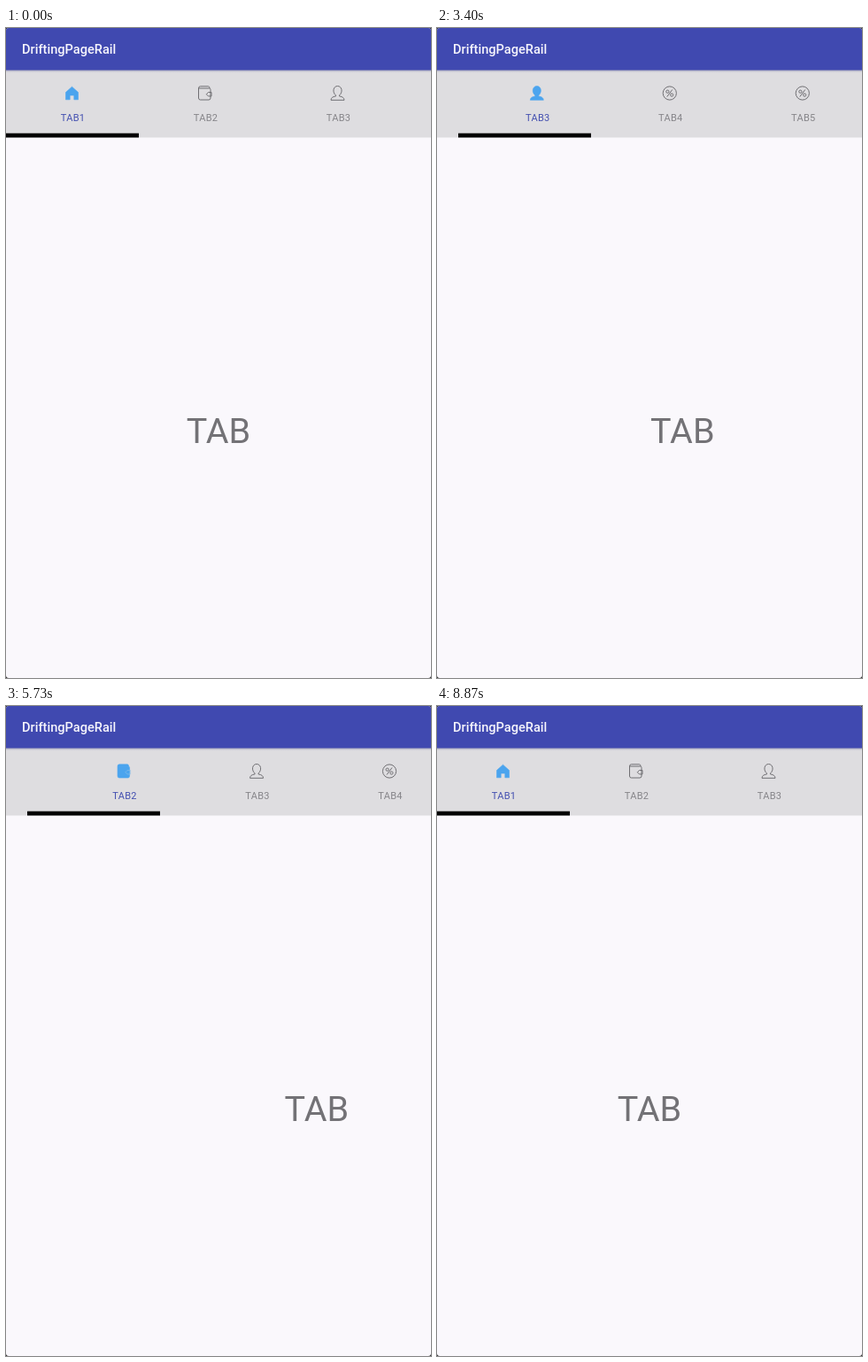
Recreate the animation shown at these times as an HTML page. Size 480 px wide and 733 px high, loop 8990 ms.

```html
<!DOCTYPE html>
<html lang="en">
<head>
<meta charset="utf-8">
<title>Sliding tabs</title>
<style>
  html, body { margin: 0; width: 100%; height: 100%; overflow: hidden; background: #222; }
  svg { display: block; font-family: Roboto, sans-serif; }
  .title { font-size: 14.6px; font-weight: 500; fill: #f6f5fc; }
  .page { font-size: 39.5px; fill: #737276; text-anchor: middle; }
  .tab text { font-size: 11px; letter-spacing: .3px; fill: #858488; text-anchor: middle; }
  .tab path { fill: none; stroke: #6f6e72; stroke-linejoin: round; }
  .tab.on text { fill: #434fb0; }
  .tab.on path { fill: #4ba4ee; stroke: #4ba4ee; stroke-width: .6; }
  .tab.on .clasp { fill: none; stroke: #8fbfe6; }
</style>
</head>
<body>
<svg width="480" height="733" viewBox="0 0 480 733">
  <defs>
    <clipPath id="screen"><rect width="480" height="733" rx="3"/></clipPath>
    <linearGradient id="shade" x2="0" y2="1">
      <stop stop-color="#9d9eba"/><stop offset="1" stop-color="#dedde0"/>
    </linearGradient>
  </defs>
  <g clip-path="url(#screen)">
    <rect width="480" height="733" fill="#faf8fc"/>
    <g id="pages"></g>
    <rect y="47" width="480" height="76.5" fill="#dedde0"/>
    <g id="strip"><rect id="bar" y="118.7" width="150" height="4.8"/></g>
    <rect y="47" width="480" height="3" fill="url(#shade)"/>
    <rect width="480" height="47.5" fill="#4049b0"/>
    <text class="title" x="18" y="28.5">DriftingPageRail</text>
  </g>
</svg>
<script>
const LOOP = 8990, FRAME = 200 / 3, TAB_W = 150, PAGE_W = 480, INSET = 24, LAG = 16.7;

const HOME = '<path d="M-7-1L0-7.3L7-1V7.3H2.3V2.5H-2.3V7.3H-7Z"/>';
const WALLET = '<path d="M-7-5.5Q-7-7.7-5-7.7H4Q5.5-7.7 5.5-5.5M-7-5.5H5Q6.5-5.5 6.5-4V5.5Q6.5 7.5 4.5 7.5H-5Q-7 7.5-7 5.5Z"/>' +
  '<path class="clasp" d="M7.5-1H4L1.8 1.2L4 3.4H7.5Z"/>';
const PERSON = '<path d="M-2 2.4C-6.2-1-5-8 0-8S6.2-1 2 2.4V3.4Q7.5 4.2 7.5 7.8H-7.5Q-7.5 4.2-2 3.4Z"/>';
const PERCENT = '<path d="M-7.6 0a7.6 7.6 0 1 1 15.2 0a7.6 7.6 0 1 1-15.2 0M3-4L-3 4' +
  'M-4-1.8a1.6 1.6 0 1 1 3.2 0a1.6 1.6 0 1 1-3.2 0M.8 2a1.6 1.6 0 1 1 3.2 0a1.6 1.6 0 1 1-3.2 0"/>';
const ICONS = [HOME, WALLET, PERSON, PERCENT, PERCENT];

// [time, pager position, tab selected on release]; a release settles to the next key
const KEYS = [
  [0, 0], [1200, 0], [1695, .265, 1], [2295, 1],
  [2350, 1], [3070, 1.398], [3200, 1.41, 2], [3800, 2],
  [4200, 2], [4857, 1.395, 1], [5457, 1],
  [5540, 1], [5700, .77], [6500, .75], [6600, .74, 0], [7200, 0], [LOOP, 0]
];

const strip = document.getElementById('strip');
const bar = document.getElementById('bar');
const pages = document.getElementById('pages');

bar.insertAdjacentHTML('beforebegin', ICONS.map((icon, i) => {
  const x = TAB_W * (i + .5);
  return `<g class="tab"><g transform="translate(${x - .5} 73.5)">${icon}</g>` +
    `<text x="${x + .5}" y="104.5">TAB${i + 1}</text></g>`;
}).join(''));
pages.innerHTML = ICONS.map((_, i) =>
  `<text class="page" x="${PAGE_W * (i + .5)}" y="468">TAB</text>`).join('');
const tabs = [...document.querySelectorAll('.tab')];

function position(t) {
  const i = Math.max(1, KEYS.findIndex(k => k[0] >= t));
  const [t0, p0, release] = KEYS[i - 1], [t1, p1] = KEYS[i];
  const u = Math.max(0, (t - t0) / (t1 - t0));
  return p0 + (p1 - p0) * (release === undefined ? u : 1 - (1 - u) ** 5);
}

function selected(t) {
  return KEYS.reduce((tab, [at, , pick]) => at <= t && pick !== undefined ? pick : tab, 0);
}

const shift = (el, x) => el.setAttribute('transform', `translate(${x.toFixed(2)} 0)`);

function draw(now) {
  const t = Math.min(134, Math.floor((now % LOOP + 3.4) / FRAME)) * FRAME;
  // the tab strip trails the pages by one screen refresh
  const left = TAB_W * position(Math.max(0, t - LAG));
  shift(pages, -PAGE_W * position(t));
  shift(strip, -Math.max(0, left - INSET));
  shift(bar, left);
  const current = selected(t);
  tabs.forEach((tab, i) => tab.classList.toggle('on', i === current));
}

const start = performance.now();
function tick() {
  draw(performance.now() - start);
  requestAnimationFrame(tick);
}
tick();
</script>
</body>
</html>
```
